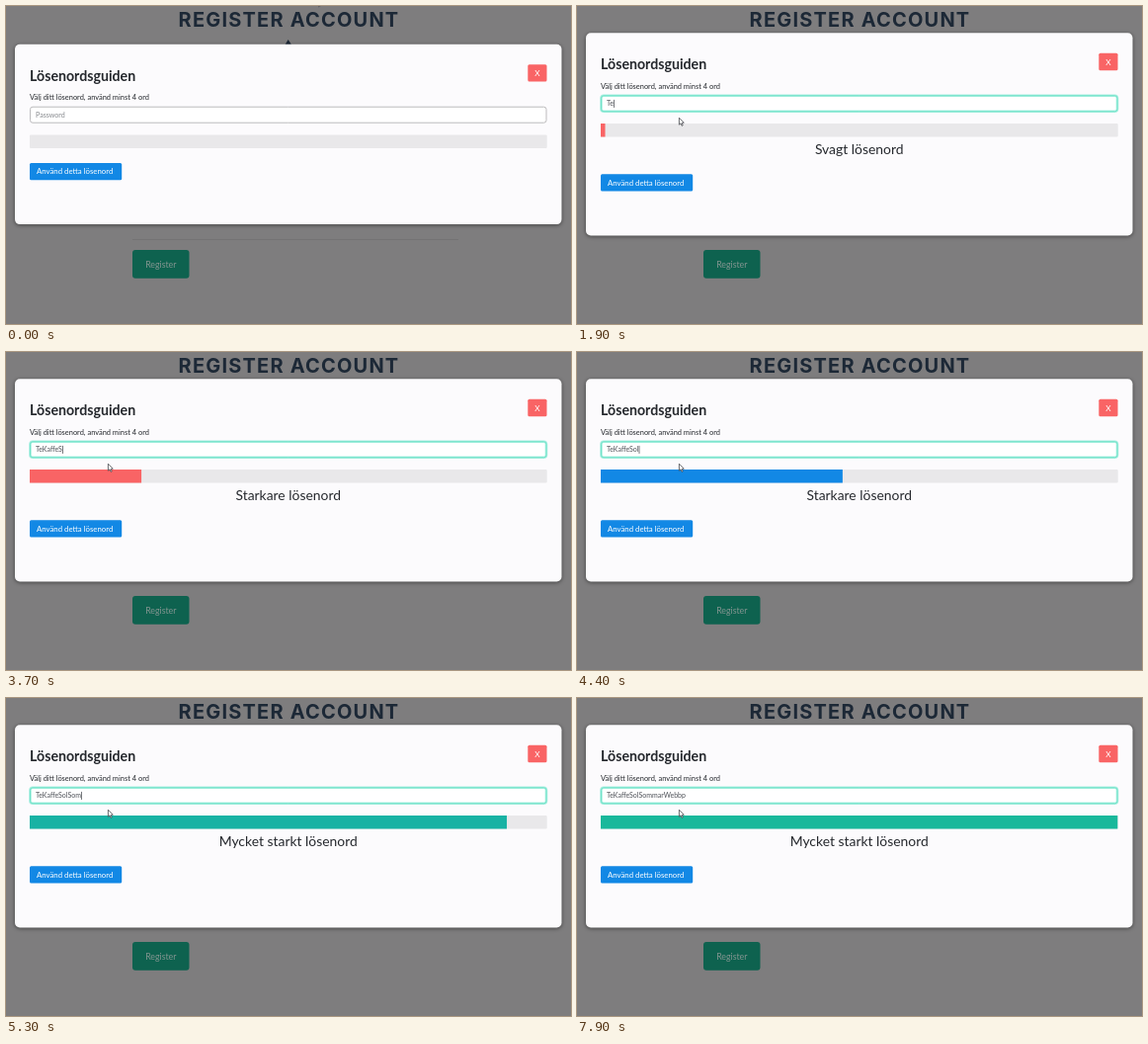
Recreate the animation shown at these times as an HTML page with a canvas. Size 572 by 322 pixels, loop 8 s.

```html
<!DOCTYPE html>
<html lang="sv">
<head>
<meta charset="utf-8">
<title>Lösenordsguiden</title>
<style>
html, body { margin: 0; width: 100%; height: 100%; overflow: hidden; background: #7e7d7e; }
canvas { display: block; width: 572px; height: 322px; }
</style>
</head>
<body>
<canvas id="stage" width="572" height="322"></canvas>
<script>
const LOOP = 8000;
const BODY = 'Lato, "Open Sans", sans-serif';
const INK = '#25282d', RED = [249, 100, 101], BLUE = [18, 136, 229], TEAL = [25, 184, 155];
const ctx = document.getElementById('stage').getContext('2d');

// Each key: time, letter, strength in percent once typed.
const KEYS = [
  [950, 'T', 0], [1700, 'e', 1.5], [2050, 'K', 4.5], [2300, 'a', 6.8], [2700, 'f', 6.8],
  [3150, 'f', 12], [3400, 'e', 24], [3700, 'S', 38], [3950, 'o', 45], [4200, 'l', 48.6],
  [4750, 'S', 73], [4950, 'o', 91], [5150, 'm', 100], [5450, 'm', 100], [5650, 'a', 100],
  [5850, 'r', 100], [6650, 'W', 100], [6800, 'e', 100], [7000, 'b', 100], [7150, 'b', 100],
  [7300, 'p', 100]
];
const FOCUS = 600, WEAK = 1700, BETTER = 3700, STRONG = 4950;

const clamp = x => Math.min(1, Math.max(0, x));
const mix = (a, b, k) => a.map((v, i) => v + (b[i] - v) * k);
const rgb = c => `rgb(${c.map(Math.round).join(',')})`;

// The CSS "ease" curve, solved for x by bisection.
function ease(x) {
  x = clamp(x);
  if (x === 0 || x === 1) return x;
  const curve = (a, b, s) => 3 * a * s * (1 - s) ** 2 + 3 * b * s * s * (1 - s) + s ** 3;
  let lo = 0, hi = 1;
  for (let i = 0; i < 20; i++) {
    const mid = (lo + hi) / 2;
    if (curve(.25, .25, mid) < x) lo = mid; else hi = mid;
  }
  return curve(.1, 1, lo);
}

function box(x, y, w, h, r, fill) {
  ctx.beginPath();
  ctx.roundRect(x, y, w, h, r);
  ctx.fillStyle = fill;
  ctx.fill();
}

function text(str, x, y, size, color, { weight = 400, align = 'left', family = BODY, gap = 0 } = {}) {
  ctx.font = `${weight} ${size}px ${family}`;
  ctx.letterSpacing = gap + 'px';
  ctx.textAlign = align;
  ctx.fillStyle = color;
  ctx.fillText(str, x, y);
}

function drawPage(tall) {
  ctx.fillStyle = '#7e7d7e';
  ctx.fillRect(0, 0, 572, 322);
  text('REGISTER ACCOUNT', 286.5, 20.8, 20, '#1c2836',
    { weight: 700, align: 'center', family: 'Inter, sans-serif', gap: 1.2 });
  ctx.beginPath();
  ctx.moveTo(285.7, 34);
  ctx.lineTo(289.5, 40);
  ctx.lineTo(282, 40);
  ctx.fill();
  if (!tall) {
    ctx.fillStyle = '#747374';
    ctx.fillRect(128, 236, 330, 1);
  }
  box(128, 247, 57.5, 28.7, 3, '#0e624f');
  text('Register', 156.8, 265, 8.8, '#839590', { align: 'center' });
}

function drawModal(tall) {
  ctx.save();
  ctx.shadowColor = 'rgba(0,0,0,.45)';
  ctx.shadowBlur = 4;
  ctx.shadowOffsetY = 1;
  if (tall) box(9, 27.3, 553.5, 205.2, 5, '#fcfbfd');
  else box(9, 38.7, 553.5, 182.4, 5, '#fcfbfd');
  ctx.restore();
}

function drawInput(t) {
  const k = ease((t - FOCUS) / 150);
  ctx.lineJoin = 'round';
  ctx.beginPath();
  ctx.roundRect(24.5, 102.2, 522.5, 16, 2.5);
  ctx.fillStyle = '#fff';
  ctx.fill();
  if (k > 0) {
    ctx.strokeStyle = `rgba(70,225,190,${.45 * k})`;
    ctx.lineWidth = 2.6;
    ctx.stroke();
  }
  ctx.strokeStyle = rgb(mix([188, 187, 189], [112, 226, 200], k));
  ctx.lineWidth = 1;
  ctx.stroke();

  const typed = KEYS.filter(key => key[0] <= t);
  const value = typed.map(key => key[1]).join('');
  if (value) text(value, 30, 112.8, 7, '#4d5157');
  else text('Password', 30, 112.8, 7.1, '#85888c');

  const last = typed.length ? typed[typed.length - 1][0] : FOCUS;
  if (t >= FOCUS && (t - last) % 1060 < 530) {
    const x = 30 + (value ? ctx.measureText(value).width : 0);
    ctx.fillStyle = '#3c4046';
    ctx.fillRect(x + .2, 106.3, .7, 8);
  }
}

function drawBar(t) {
  box(24, 130.4, 523.7, 13.5, 1, '#e9e8ea');
  let level = 0, before = 0;
  for (const [at, , goal] of KEYS) {
    level += (goal - before) * ease((t - at) / 600);
    before = goal;
  }
  if (level <= 0) return;
  const warm = mix(RED, BLUE, ease((t - BETTER) / 600));
  const color = mix(warm, TEAL, ease((t - STRONG) / 600));
  ctx.fillStyle = rgb(color);
  ctx.fillRect(24, 130.4, 523.3 * level / 100, 13.5);
}

function drawForm(t, tall) {
  ctx.save();
  if (tall) ctx.translate(0, -11.4);
  text('Lösenordsguiden', 24, 75.6, 14.2, INK, { weight: 700 });
  box(528.3, 59.2, 19.2, 17.4, 1.5, rgb(RED));
  text('X', 537.9, 71, 8.2, '#fff', { align: 'center' });
  text('Välj ditt lösenord, använd minst 4 ord', 24, 95.3, 7.45, INK);
  drawInput(t);
  drawBar(t);
  ctx.restore();

  if (tall) {
    const label = t < BETTER ? 'Svagt lösenord' : t < STRONG ? 'Starkare lösenord' : 'Mycket starkt lösenord';
    text(label, 285.7, 149.6, 13.9, INK, { align: 'center' });
  }
  const y = tall ? 170.2 : 158.9;
  box(24, y, 93.2, 17.3, 1.5, rgb(BLUE));
  text('Använd detta lösenord', 31, y + 11.4, 7.8, '#fff');
}

function drawArrow(x, y) {
  ctx.beginPath();
  [[0, 0], [0, 7], [1.6, 5.6], [2.7, 8.1], [3.8, 7.6], [2.8, 5.2], [4.9, 5]]
    .forEach(([dx, dy]) => ctx.lineTo(x + dx, y + dy));
  ctx.closePath();
  ctx.fillStyle = '#fff';
  ctx.fill();
  ctx.strokeStyle = '#44464c';
  ctx.lineWidth = .8;
  ctx.stroke();
}

function drawPointer(t) {
  if (t >= WEAK) return drawArrow(103.4, 113.2);
  if (t >= KEYS[0][0]) return;
  const k = ease(t / 500);
  const x = 314 + (103.4 - 314) * k, y = -7.2 + 120.4 * k;
  if (y < 102) return drawArrow(x, y);
  ctx.fillStyle = '#44464c';
  ctx.fillRect(x - .4, y - 4, .8, 8);
  ctx.fillRect(x - 1.5, y - 4, 3, .7);
  ctx.fillRect(x - 1.5, y + 3.3, 3, .7);
}

function frame(now) {
  const t = now % LOOP;
  const tall = t >= WEAK;
  drawPage(tall);
  drawModal(tall);
  drawForm(t, tall);
  drawPointer(t);
}

let start;
function tick(now) {
  if (start === undefined) start = now;
  frame(now - start);
  requestAnimationFrame(tick);
}
frame(0);
requestAnimationFrame(tick);
</script>
</body>
</html>
```
